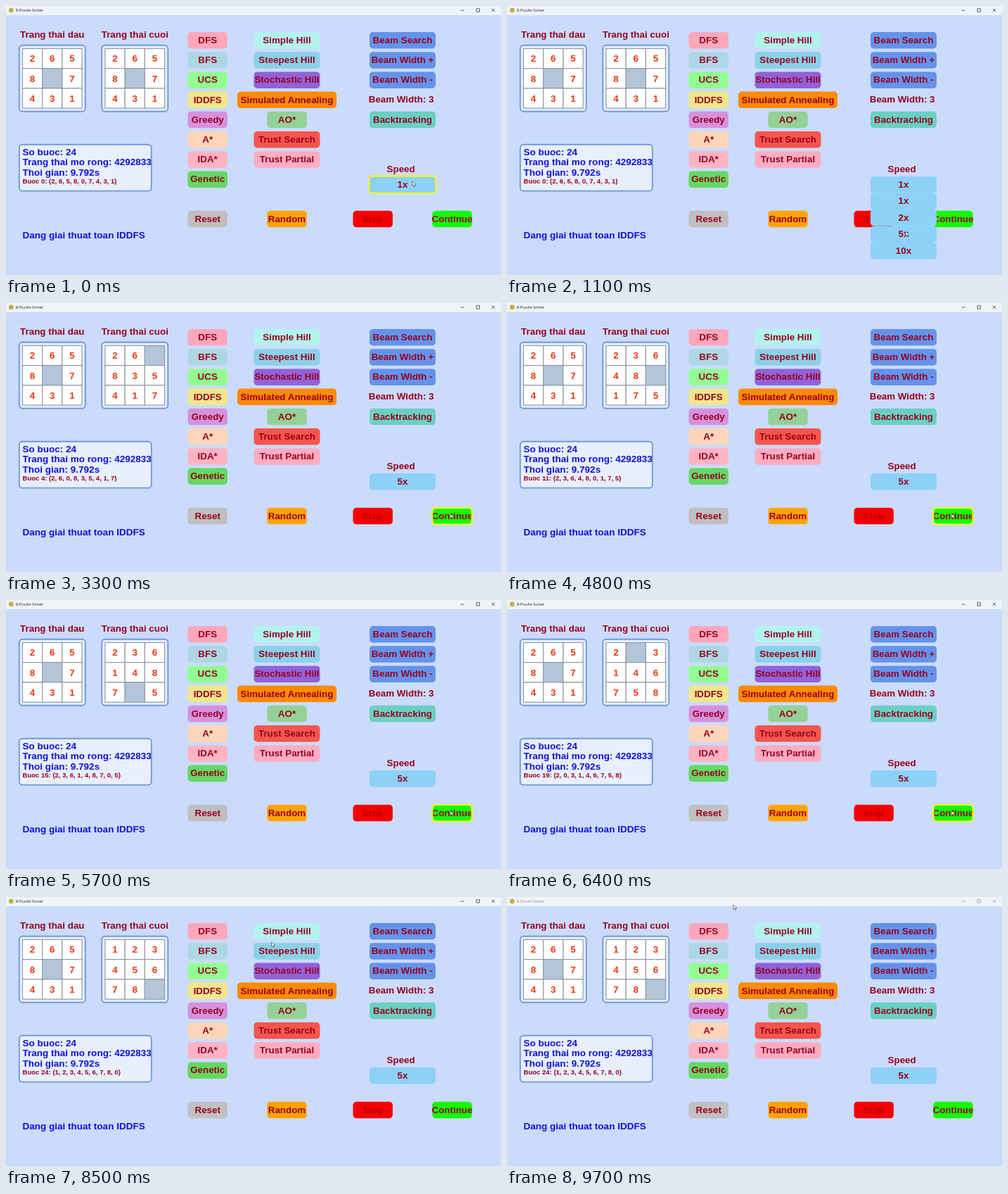
Recreate the animation shown at these times as an HTML page. Size 704 by 382 pixels, loop 9.8 s.

```html
<!DOCTYPE html>
<html lang="vi">
<head>
<meta charset="utf-8">
<title>8-Puzzle Solver</title>
<style>
html, body { margin: 0; width: 100%; height: 100%; overflow: hidden; background: #cbdbfc; }
svg { display: block; width: 704px; height: 382px; }
text { font: bold 28.5px "Liberation Sans", Arial, sans-serif; fill: #98001e; }
.mid { text-anchor: middle; }
.blue { font-size: 28.8px; fill: #1010dc; }
.small { font-size: 20.3px; }
.digit { fill: #ee3510; }
.panel { fill: #e7effd; stroke: #7099d6; stroke-width: 4; }
.hover { fill: none; stroke: #f2f32a; stroke-width: 5; }
.caption { font: 5.6px "Open Sans", sans-serif; }
</style>
</head>
<body>
<svg id="stage" viewBox="0 0 704 382"></svg>
<script>
const LOOP = 9800, FIRST_STEP = 2597, STEP_MS = 211;
const MENU_OPEN = 500, MENU_CLOSE = 1450;
const START = [2, 6, 5, 8, 0, 7, 4, 3, 1];
const MOVES = 'DRUULDLDRRULLDRRUULLDRDR';
const SHIFT = { U: -3, D: 3, L: -1, R: 1 };
const CURSOR = [[0, 578, 249], [450, 578, 249], [1000, 567, 320], [1500, 567, 320],
  [2000, 606, 307], [2300, 632, 299], [7500, 632, 299], [7750, 604, 280], [8800, 322, 11]];

const stage = document.getElementById('stage');

function add(parent, tag, attrs, content) {
  const node = document.createElementNS('http://www.w3.org/2000/svg', tag);
  for (const key in attrs) node.setAttribute(key, attrs[key]);
  if (content !== undefined) node.textContent = content;
  return parent.appendChild(node);
}
const rect = (parent, x, y, width, height, attrs) =>
  add(parent, 'rect', { x, y, width, height, ...attrs });
const label = (parent, x, y, content, cls = '') =>
  add(parent, 'text', { x, y, class: cls }, content);
const show = (node, visible) => node.setAttribute('visibility', visible ? 'visible' : 'hidden');

function button(parent, x, y, width, name, fill) {
  rect(parent, x, y, width, 50, { rx: 10, fill });
  return label(parent, x + width / 2, y + 34, name, 'mid');
}
function column(x, width, items) {
  items.forEach(([name, fill], row) => name && button(app, x, 50 + row * 60, width, name, fill));
}

// Window frame
rect(stage, 0, 0, 704, 382, { fill: '#cbdbfc' });
rect(stage, 0, 0, 704, 13, { fill: '#eff4f9' });
add(stage, 'circle', { cx: 7.3, cy: 6, r: 3.4, fill: '#c5b040' });
const caption = add(stage, 'g', {});
label(caption, 14, 8, '8-Puzzle Solver', 'caption');
const controls = add(caption, 'path', {
  d: 'M646.5 6.2h5M669 3.8h4.4v4.4h-4.4zM690.8 3.8l4.4 4.4m0-4.4l-4.4 4.4',
  fill: 'none', 'stroke-width': 0.7
});

// Application area
const app = add(stage, 'g', { transform: 'translate(0 13.5) scale(.47)' });

function board(x, title) {
  label(app, x + 100, 68, title, 'mid');
  rect(app, x, 90, 200, 200, { rx: 10, class: 'panel' });
  return START.map((_, i) => {
    const cx = x + 10 + i % 3 * 60, cy = 100 + Math.floor(i / 3) * 60;
    const box = rect(app, cx, cy, 60, 60, { stroke: '#8f9aa6', 'stroke-width': 2.5 });
    return { box, digit: label(app, cx + 30, cy + 40, '', 'mid digit') };
  });
}
function fillBoard(cells, state) {
  cells.forEach(({ box, digit }, i) => {
    box.setAttribute('fill', state[i] ? '#fff' : '#b2c5d9');
    digit.textContent = state[i] || '';
  });
}

fillBoard(board(40, 'Trang thai dau'), START);
const current = board(290, 'Trang thai cuoi');

rect(app, 40, 390, 400, 140, { rx: 10, class: 'panel' });
['So buoc: 24', 'Trang thai mo rong: 4292833', 'Thoi gian: 9.792s']
  .forEach((line, i) => label(app, 50, 423 + i * 30, line, 'blue'));
const stepText = label(app, 50, 507, '', 'small');
label(app, 50, 673, 'Dang giai thuat toan IDDFS', 'blue');

column(550, 120, [['DFS', '#fca7bc'], ['BFS', '#add7e5'], ['UCS', '#92ff92'], ['IDDFS', '#f0e68c'],
  ['Greedy', '#d791dc'], ['A*', '#fdd6ba'], ['IDA*', '#fdb3c4'], ['Genetic', '#64d864']]);
column(750, 200, [['Simple Hill', '#b3f3ed'], ['Steepest Hill', '#8ad1e8'], ['Stochastic Hill', '#9162d8'],
  [], [], ['Trust Search', '#f4564e'], ['Trust Partial', '#fdacc2']]);
button(app, 700, 230, 300, 'Simulated Annealing', '#fb8a04');
button(app, 790, 290, 120, 'AO*', '#94d196');
column(1100, 200, [['Beam Search', '#6593ea'], ['Beam Width +', '#6593ea'], ['Beam Width -', '#6593ea'],
  [], ['Backtracking', '#6bd0c2']]);
label(app, 1196, 263, 'Beam Width: 3', 'mid');
label(app, 1195, 473, 'Speed', 'mid');

button(app, 550, 590, 120, 'Reset', '#c0c0c0');
button(app, 790, 590, 120, 'Random', '#ffa302');
button(app, 1050, 590, 120, 'Stop', '#f50000').style.fill = '#b80008';
button(app, 1290, 590, 120, 'Continue', '#14fb08');
const continueHover = rect(app, 1290, 590, 120, 50, { rx: 10, class: 'hover' });

const speed = button(app, 1100, 486, 200, '1x', '#8dd1f8');
const speedHover = rect(app, 1099, 485, 202, 52, { rx: 10, class: 'hover' });
const menu = add(app, 'g', {});
['1x', '2x', '5x', '10x'].forEach((name, i) => button(menu, 1100, 536 + i * 50, 200, name, '#8dd1f8'));

const pointer = add(stage, 'path', {
  d: 'M0 0V6.6L1.6 5.2L2.7 7.6L3.8 7.1L2.8 4.8H4.8Z',
  fill: '#fff', stroke: '#333', 'stroke-width': 0.6
});

// Every board position along the solution
const states = [START];
for (const move of MOVES) {
  const next = states[states.length - 1].slice();
  const gap = next.indexOf(0), other = gap + SHIFT[move];
  [next[gap], next[other]] = [next[other], 0];
  states.push(next);
}

function cursorAt(t) {
  const i = CURSOR.findIndex(key => key[0] > t);
  if (i < 0) return CURSOR[CURSOR.length - 1].slice(1);
  const [t0, x0, y0] = CURSOR[i - 1], [t1, x1, y1] = CURSOR[i];
  const p = (t - t0) / (t1 - t0), ease = p * p * (3 - 2 * p);
  return [x0 + (x1 - x0) * ease, y0 + (y1 - y0) * ease];
}

function render(t) {
  const step = Math.max(0, Math.min(MOVES.length, Math.floor((t - FIRST_STEP) / STEP_MS) + 1));
  fillBoard(current, states[step]);
  stepText.textContent = `Buoc ${step}: (${states[step].join(', ')})`;

  speed.textContent = t < MENU_CLOSE ? '1x' : '5x';
  show(menu, t >= MENU_OPEN && t < MENU_CLOSE);
  show(speedHover, t < MENU_OPEN);
  show(continueHover, t >= 2050 && t < 7650);

  const ink = t < 9700 ? '#222' : '#8d9196';
  caption.firstChild.style.fill = ink;
  controls.setAttribute('stroke', ink);
  pointer.setAttribute('transform', `translate(${cursorAt(t)})`);
}

const began = performance.now();
function tick() {
  render((performance.now() - began) % LOOP);
  requestAnimationFrame(tick);
}
tick();
</script>
</body>
</html>
```
